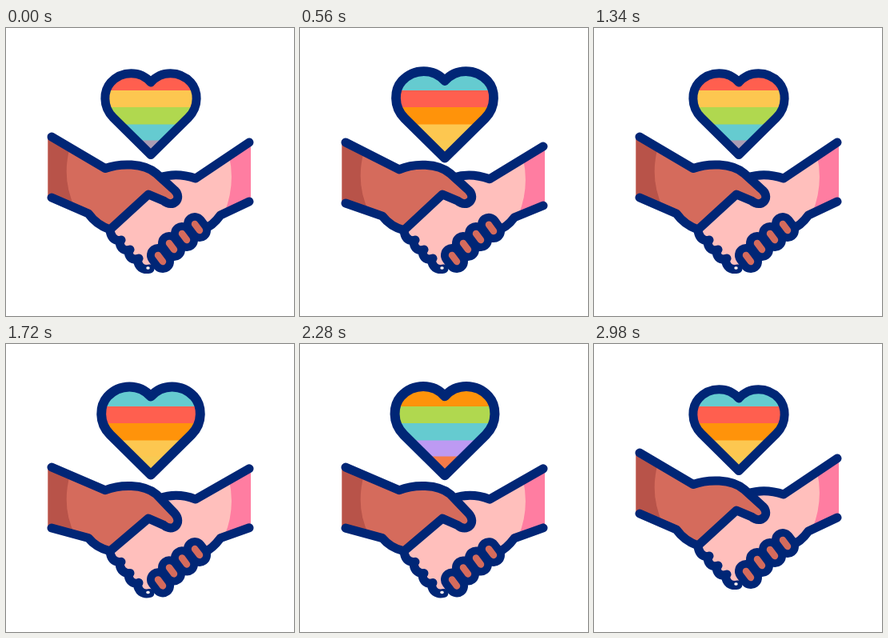
These frames come from a looping animation (360x360 px, 3000 ms). An HTML page:

```html
<!DOCTYPE html>
<html lang="en">
<head>
<meta charset="utf-8">
<title>Handshake</title>
<style>
  html, body { margin: 0; width: 100%; height: 100%; overflow: hidden; background: #fff; }
  svg { display: block; width: 100%; height: 100%; }
  .line { fill: none; stroke: #002676; stroke-width: 11; stroke-linecap: round; stroke-linejoin: round; }
  .knuckle { stroke-width: 28; }
  .finger { stroke: #d56b5c; stroke-width: 8.5; }
  .tip { stroke: #fff1f0; stroke-width: 3.5; }
</style>
</head>
<body>
<svg viewBox="0 0 360 360">
  <defs>
    <path id="heart" d="M181,158.5 L134,112 C120,98 122,78 131,68 C145,53 168,53 181,68 C194,53 217,53 231,68 C240,78 242,98 228,112 Z"/>
    <clipPath id="inHeart"><use href="#heart" class="beat"/></clipPath>
    <clipPath id="cuffs"><rect x="52.5" width="253.5" height="360"/></clipPath>
  </defs>

  <g id="stripes" clip-path="url(#inHeart)"></g>
  <use href="#heart" class="line beat"/>

  <g id="hands">
    <g clip-path="url(#cuffs)">
      <path fill="#ffbfbc" d="M178,200 L192,187 Q213,180 237,188 L308,141 L308,216 L268,234 Q258,248 247,251 L192,291 L180,302 Q166,304 164,289 Q153,290 153,278 Q142,278 142,266 Q131,265 130,252 Z"/>
      <path fill="#ff7da1" d="M279,160 L308,141 L308,216 L273,231 Q287,196 279,160 Z"/>
    </g>
    <path class="line" d="M192,187 Q213,180 237,188 L304,143"/>
    <path class="line" d="M304,217 L268,234 Q258,248 247,251"/>
    <path class="line" d="M130,252 Q131,265 142,266 Q142,278 153,278 Q153,290 164,289 Q166,304 180,301"/>
    <path class="line" d="M142,266 L144,265 M153,278 L155,277 M164,289 L166,288"/>

    <g clip-path="url(#cuffs)">
      <path fill="#d56b5c" d="M50,132 L124,175.5 C142,169 172,168 188,182 L211,203 C221,213 209,226 197,216 L178,208 L130,252 Q113,246 103,232 L50,209 Z"/>
      <path fill="#b85349" d="M50,132 L80,149 Q69,188 86,225 L50,209 Z"/>
    </g>
    <path class="line" d="M57,136 L124,175.5 C142,169 172,168 188,182 L211,203 C221,213 209,226 197,216 L178,208 L130,252 Q113,246 103,232 L57,212"/>
  </g>
</svg>
<script>
const COLORS = ['#ff5f4f', '#ff930a', '#fdc750', '#b0d84f', '#65cbd0', '#bd9af3'];
const TIP = ['#aa9cb4', '#f67a48', '#ff9f42', '#fdc04c', '#f8ca52', '#65cbd0'];
const EDGES = [40, 78, 99, 120.5, 140.5, 175];
const KNUCKLES = [[239, 249], [223, 261], [207, 273], [193, 288]];
const NS = 'http://www.w3.org/2000/svg';
const $ = id => document.getElementById(id);

function add(parent, tag, attrs) {
  const el = parent.appendChild(document.createElementNS(NS, tag));
  for (const key in attrs) el.setAttribute(key, attrs[key]);
  return el;
}

const stripes = EDGES.slice(1).map((end, i) =>
  add($('stripes'), 'rect', { x: 100, y: EDGES[i], width: 160, height: end - EDGES[i] + 0.5 }));

for (const name of ['line knuckle', 'line finger'])
  for (const [x, y] of KNUCKLES)
    add($('hands'), 'path', { class: name, d: `M${x - 3},${y - 4} L${x + 3},${y + 4}` });
add($('hands'), 'path', { class: 'line tip', d: 'M177,300 L178,300' });

const paths = [...$('hands').querySelectorAll('path')].map(el => ({ el, d: el.getAttribute('d') }));
const beats = document.querySelectorAll('.beat');

const clamp = v => Math.min(1, Math.max(0, v));
const ease = (t, from, to) => (1 - Math.cos(Math.PI * clamp((t - from) / (to - from)))) / 2;

// piecewise linear curve through [x, value] points
function along(points, x) {
  for (let i = 1; i < points.length; i++) {
    const [x0, v0] = points[i - 1], [x1, v1] = points[i];
    if (x <= x1 || i === points.length - 1) return v0 + (v1 - v0) * (x - x0) / (x1 - x0);
  }
}
const DROP = [[57, 17], [123, 9], [158, 10.5], [208, 8], [240, 7], [304, 12]];

// vertical shift of a point: elbows sink while active, the grip swings further
function shift(x, y, active, swing) {
  const elbow = 7 * clamp((140 - x) / 83) + 5 * clamp((x - 225) / 79);
  const drop = along(DROP, x);
  const grip = clamp((y - 185) / 25) * clamp((60 - Math.abs(x - 200)) / 20);
  return active * elbow + swing * (drop + (16 - drop) * grip);
}

function draw(time) {
  const p = time % 1500;
  const active = ease(p, 80, 190) - ease(p, 1025, 1150);
  const swing = 1.2 * (ease(p, 100, 330) - ease(p, 330, 550) + ease(p, 580, 960) - ease(p, 960, 1150));

  for (const { el, d } of paths)
    el.setAttribute('d', d.replace(/([\d.]+),([\d.]+)/g, (_, x, y) =>
      `${x},${(+y + shift(+x, +y, active, swing)).toFixed(2)}`));

  const pulse = p > 100 && p < 1000 ? Math.sin(Math.PI * (p - 100) / 450) ** 2 : 0;
  const scale = 1 + 0.068 * active + 0.025 * pulse;
  for (const el of beats)
    el.setAttribute('transform', `translate(181 97) scale(${scale}) translate(-181 -97)`);

  const state = (18 - Math.floor(time / 200)) % 6;
  stripes.forEach((el, i) => el.setAttribute('fill',
    i === 4 ? TIP[state] : COLORS[(state + i + (i > 0 ? 1 : 0)) % 6]));
}

const start = performance.now();
function tick() {
  draw((performance.now() - start) % 3000);
  requestAnimationFrame(tick);
}
tick();
</script>
</body>
</html>
```
